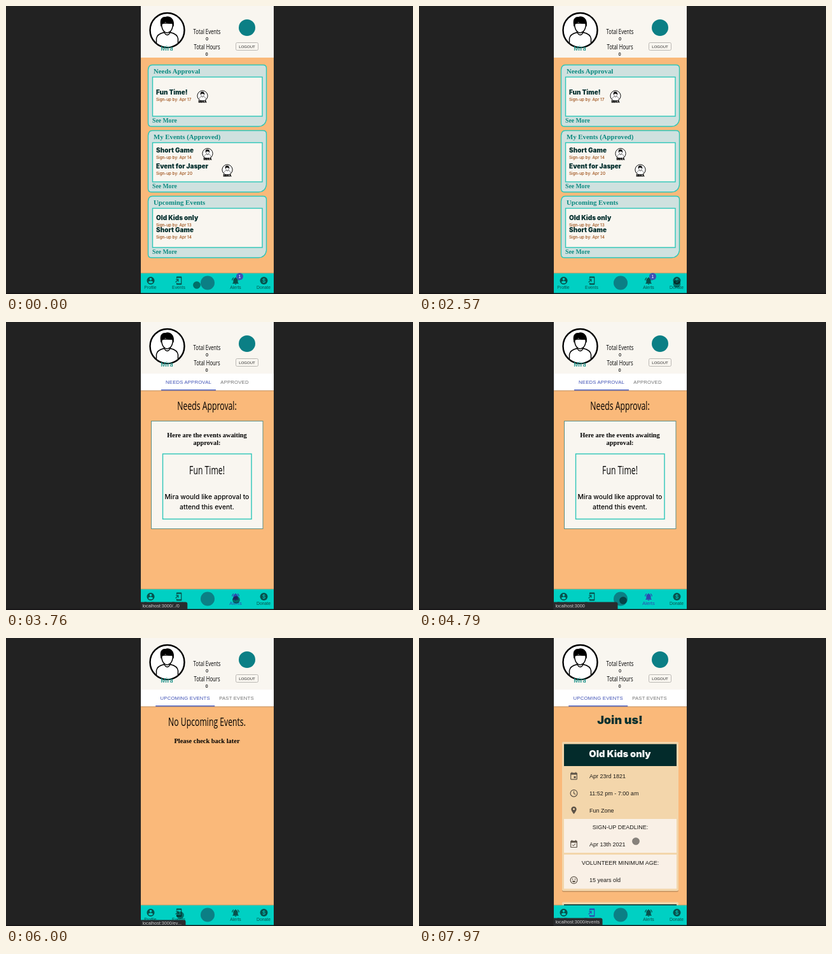
An HTML page that plays this animation: 640 by 452 pixels, repeating every 8000 ms.

```html
<!DOCTYPE html>
<html lang="en">
<head>
<meta charset="utf-8">
<title>Volunteer app</title>
<style>
html, body { margin: 0; width: 100%; height: 100%; overflow: hidden; background: #222; }
svg { display: block; width: 100%; height: 100%; }
text { font-family: "Liberation Sans", Arial, sans-serif; white-space: pre; }
.serif { font-family: "Liberation Serif", Times, serif; font-weight: 700; }
.round { font-family: Inter, sans-serif; font-weight: 500; }
.fat { font-family: Inter, sans-serif; font-weight: 900; }
.slim { font-family: "Open Sans", sans-serif; font-weight: 500; }
.tab { font-size: 7.7px; letter-spacing: .2px; }
</style>
</head>
<body>
<svg id="stage" viewBox="0 0 640 452"></svg>
<script>
const LOOP = 8000;
const TEAL = '#2cc6b8', INK = '#06302f', CREAM = '#f9f6f0', BLUE = '#3f51b5';
const NAV_INK = '#07524d', TITLE = '#0c8a80', RUST = '#9a4a10', LOGO = '#0b7f85';
const MEMBER = 'Mira';

const ICONS = {
  person: 'M12 2C6.48 2 2 6.48 2 12s4.48 10 10 10 10-4.48 10-10S17.52 2 12 2zm0 3c1.66 0 3 1.34 3 3s-1.34 3-3 3-3-1.34-3-3 1.34-3 3-3zm0 14.2c-2.5 0-4.71-1.28-6-3.22.03-1.99 4-3.08 6-3.08 1.99 0 5.97 1.09 6 3.08-1.29 1.94-3.5 3.22-6 3.22z',
  phone: 'M18 1H8c-1.1 0-2 .9-2 2v3h2V5h10v14H8v-1H6v3c0 1.1.9 2 2 2h10c1.1 0 2-.9 2-2V3c0-1.1-.9-2-2-2zM10 15h2V8H5v2h3.59L3 15.59 4.41 17 10 11.41V15z',
  bell: 'M7.58 4.08L6.15 2.65C3.75 4.48 2.17 7.3 2.03 10.5h2c.15-2.65 1.51-4.97 3.55-6.42zm12.39 6.42h2c-.15-3.2-1.73-6.02-4.12-7.85l-1.42 1.43c2.02 1.45 3.39 3.77 3.54 6.42zM18 11c0-3.07-1.64-5.64-4.5-6.32V4c0-.83-.67-1.5-1.5-1.5s-1.5.67-1.5 1.5v.68C7.63 5.36 6 7.92 6 11v5l-2 2v1h16v-1l-2-2v-5zm-6 11c1.1 0 2-.9 2-2h-4c0 1.1.9 2 2 2z',
  day: 'M17 12h-5v5h5v-5zM16 1v2H8V1H6v2H5c-1.11 0-2 .9-2 2v14c0 1.1.89 2 2 2h14c1.1 0 2-.9 2-2V5c0-1.1-.9-2-2-2h-1V1h-2zm3 18H5V8h14v11z',
  check: 'M16.53 11.06L15.47 10l-4.88 4.88-2.12-2.12-1.06 1.06L10.59 17l5.94-5.94zM19 3h-1V1h-2v2H8V1H6v2H5c-1.11 0-2 .9-2 2v14c0 1.1.89 2 2 2h14c1.1 0 2-.9 2-2V5c0-1.1-.9-2-2-2zm0 16H5V8h14v11z',
  pin: 'M12 2C8.13 2 5 5.13 5 9c0 5.25 7 13 7 13s7-7.75 7-13c0-3.87-3.13-7-7-7zm0 9.5c-1.38 0-2.5-1.12-2.5-2.5s1.12-2.5 2.5-2.5 2.5 1.12 2.5 2.5-1.12 2.5-2.5 2.5z'
};

const text = (x, y, s, size, fill = '#000', cls = '', mid = false) =>
  `<text x="${x}" y="${y}" class="${cls}" fill="${fill}"${size ? ` font-size="${size}"` : ''}${mid ? ' text-anchor="middle"' : ''}>${s}</text>`;
const center = (x, y, s, size, fill, cls) => text(x, y, s, size, fill, cls, true);
const slim = (x, y, s, size) =>
  `<g transform="translate(${x} ${y}) scale(.68 1)">${center(0, 0, s, size, '#000', 'slim')}</g>`;
const rect = (x, y, w, h, fill, extra = '') =>
  `<rect x="${x}" y="${y}" width="${w}" height="${h}" fill="${fill}" ${extra}/>`;
const circle = (x, y, r, fill, extra = '') =>
  `<circle cx="${x}" cy="${y}" r="${r}" fill="${fill}" ${extra}/>`;
const icon = (x, y, name, k = .6) =>
  `<path transform="translate(${x - 12 * k} ${y - 12 * k}) scale(${k})" d="${ICONS[name]}"/>`;
const group = (id, body, extra = '') => `<g id="${id}" ${extra}>${body}</g>`;

// Generic person badge drawn around 0,0 in a circle of radius 27
const avatar = (x, y, k, line) => `<g transform="translate(${x} ${y}) scale(${k})" stroke="#000" stroke-linejoin="round">
  <circle r="27" fill="#fff" stroke-width="${line}"/>
  <path d="M-17 20.5V13Q-16 6-5 3.500V-1H5V3.500Q16 6 17 13V20.500Q0 33-17 20.500Z" fill="#fff" stroke-width="1.500"/>
  <path d="M-5 3Q0 12 5 3" fill="none" stroke-width="1.500"/>
  <path d="M-9-11C-9 0-4 4 0 4S9 0 9-11Z" fill="#fff" stroke-width="1.500"/>
  <path d="M-9.500-6C-12-16-9-21-3-20.500C4-23 12-18 9.500-6L8-11Q2-10-3-13Q-6-10-8-10Z"/></g>`;
const miniAvatar = (x, y) => avatar(x, y, .3, 3.2) + center(x, y + 10.5, MEMBER.toUpperCase(), 4.8, '#000', 'fat');

const entry = (y, name, date) =>
  text(236, y, name, 10, INK, 'fat') + text(236, y + 10.2, 'Sign-up by: ' + date, 6.3, RUST, 'round');

const homeCard = (y, title, body) =>
  `<path d="M230 ${y}H404Q409.500 ${y} 409.500 ${y + 5}V${y + 85}Q408 ${y + 96} 397 ${y + 96.5}H228.500Q223.500 ${y + 96.5} 223.500 ${y + 91}V${y + 8}Q224 ${y} 230 ${y}Z" fill="#cfe1df" stroke="${TEAL}" stroke-width="1.400"/>`
  + rect(230.5, y + 19, 172.5, 61.5, CREAM, `stroke="${TEAL}" stroke-width="1.4"`)
  + text(232, y + 13.5, title, 10.8, TITLE, 'serif')
  + text(230, y + 90, 'See More', 9.7, TITLE, 'serif') + body;

const tabs = (x, w, on, x2, off) =>
  rect(212, 82, 209, 26.5, '#00000030') + rect(212, 81, 209, 26.3, '#fff')
  + center(x, 97, on, 0, BLUE, 'tab') + center(x2, 97, off, 0, '#737373', 'tab')
  + rect(x - w / 2, 106, w, 1.4, BLUE);

const home = homeCard(92.5, 'Needs Approval', entry(139, 'Fun Time!', 'Apr 17') + miniAvatar(309, 141))
  + homeCard(195.5, 'My Events (Approved)',
      entry(230, 'Short Game', 'Apr 14') + miniAvatar(317, 231.5)
      + entry(255, 'Event for Jasper', 'Apr 20') + miniAvatar(348, 257))
  + homeCard(298.5, 'Upcoming Events',
      entry(335.5, 'Old Kids only', 'Apr 13') + entry(355.2, 'Short Game', 'Apr 14'));

const alerts = tabs(287, 86, 'NEEDS APPROVAL', 359.5, 'APPROVED')
  + slim(316, 138, 'Needs Approval:', 18)
  + rect(228.5, 155.5, 175.5, 169, CREAM, 'stroke="#5e8f84"')
  + center(316, 181.3, 'Here are the events awaiting', 10.35, '#000', 'serif')
  + center(316, 193.3, 'approval:', 10.35, '#000', 'serif')
  + rect(246.5, 207, 139.5, 102.3, CREAM, `stroke="${TEAL}" stroke-width="1.4"`)
  + slim(316, 239, 'Fun Time!', 18)
  + center(316, 277.5, MEMBER + ' would like approval to', 10.4, '#000', 'round')
  + center(316, 294, 'attend this event.', 10.4, '#000', 'round');

const eventTabs = tabs(281.7, 93, 'UPCOMING EVENTS', 362.5, 'PAST EVENTS');

const empty = eventTabs + slim(316, 138, 'No Upcoming Events.', 18)
  + center(316, 164.5, 'Please check back later', 10.4, '#000', 'serif');

const eventCard = y => rect(225, y + 1.5, 183, 234, '#00000038', 'rx="2"')
  + rect(225, y, 183, 234, '#f3d6ab', 'rx="2"') + rect(228, y + 3.5, 177, 34.5, '#032b2b');
const row = (y, s) => text(268, y + 3.2, s, 9, '#1c1a17');
const GREY = '#5d5347';

const events = eventTabs + center(316, 135, 'Join us!', 18, INK, 'fat')
  + eventCard(163) + center(316, 187, 'Old Kids only', 14.7, '#fff', 'fat')
  + rect(228, 284, 177, 53, '#f9f0e6') + rect(228, 340, 177, 53.5, '#f9f0e6')
  + row(217, 'Apr 23rd 1821') + row(243.7, '11:52 pm - 7:00 am') + row(270.4, 'Fun Zone')
  + center(316.5, 300, 'SIGN-UP DEADLINE:', 9, '#1c1a17') + row(323.7, 'Apr 13th 2021')
  + center(316.5, 356, 'VOLUNTEER MINIMUM AGE:', 9, '#1c1a17') + row(380, '15 years old')
  + `<g fill="${GREY}">${icon(243.5, 217, 'day')}${icon(243.5, 270.4, 'pin')}${icon(243.5, 323.7, 'check')}
     <circle cx="241.500" cy="378.500" r=".9"/><circle cx="245.500" cy="378.500" r=".9"/><path d="M240.500 381H246.500Q243.500 386 240.500 381Z"/></g>`
  + `<g fill="none" stroke="${GREY}" stroke-width="1.200"><circle cx="243.500" cy="243.700" r="5.400"/>
     <circle cx="243.500" cy="380" r="5.400"/><path d="M243.500 240.500V244L246.200 245.600"/></g>`
  + eventCard(414.5);

const header = rect(212, 0, 209, 81, CREAM)
  + avatar(253.5, 38, 1, 2.4) + center(253, 70, MEMBER, 9.2, TITLE, 'round')
  + slim(316, 44, 'Total Events', 11.3) + center(316, 53.5, '0', 6.5, '#000', 'round')
  + slim(316, 68, 'Total Hours', 11.3) + center(315.5, 78, '0', 6.5, '#000', 'round')
  + circle(379, 34, 13, LOGO)
  + rect(361.5, 57.5, 35, 12, 'none', 'rx="2" stroke="#b5b3ae" stroke-width=".9"')
  + center(379, 65.7, 'LOGOUT', 6, '#222');

const navItem = (id, x, label, art) => group(id, art + `<text x="${x}" y="444.300" text-anchor="middle">${label}</text>`);
const nav = rect(212, 418.5, 209, 2, '#00000022') + rect(212, 419.5, 209, 31.5, '#00d0c3')
  + circle(317, 434.5, 11, LOGO)
  + navItem('profile', 227, 'Profile', icon(227.5, 431, 'person'))
  + navItem('list', 271.5, 'Events', icon(271.5, 431, 'phone'))
  + navItem('bell', 361, 'Alerts', icon(361, 431.5, 'bell'))
  + navItem('give', 405, 'Donate', circle(405.5, 431, 6, 'inherit') + center(405.5, 434.2, '$', 9, '#00d0c3'))
  + group('badge', circle(0, 0, 5.5, BLUE) + center(0, 2.4, '1', 6.8, '#fff'));

const stage = document.getElementById('stage');
stage.innerHTML = '<defs><clipPath id="body"><path d="M212 81H421V451H212Z"/></clipPath></defs>'
  + rect(0, 0, 640, 452, '#222') + rect(212, 0, 209, 451, '#fab97a') + header
  + `<g clip-path="url(#body)">${group('home', home)}${group('alerts', alerts)}${group('empty', empty)}${group('events', events)}</g>`
  + nav + rect(0, 450.5, 640, 1.5, '#151315')
  + circle(361.5, 436, 18, '#000', 'id="ripple"')
  + group('status', '<path id="bubble" fill="#2a2c2e"/>' + text(214.5, 447.5, '', 7.2, '#cfcfcf'))
  + circle(0, 0, 5.6, '#000', 'id="cursor" fill-opacity=".46" stroke="#000" stroke-opacity=".25" stroke-width=".8"');

const el = id => document.getElementById(id);
const set = (id, attrs) => { for (const k in attrs) el(id).setAttribute(k, attrs[k]); };
const clamp = v => Math.max(0, Math.min(1, v));
const ease = v => v * v * (3 - 2 * v);
const ramp = (t, a, b) => ease(clamp((t - a) / (b - a)));

// time, x, y
const PATH = [
  [0, 300, 438], [700, 290, 438], [1460, 256, 436], [1720, 228, 436], [1850, 227, 436],
  [2500, 407, 436], [2600, 405, 436], [2860, 362, 436], [4200, 362, 436], [4790, 321, 437],
  [5300, 321, 437], [5950, 274, 435], [6250, 274, 435], [6860, 226, 432], [7250, 226, 432],
  [7970, 341, 319], [LOOP, 341, 319]
];

function cursorAt(t) {
  const i = PATH.findIndex(p => p[0] > t);
  const a = PATH[i - 1], b = PATH[i], k = ramp(t, a[0], b[0]);
  return [a[1] + (b[1] - a[1]) * k, a[2] + (b[2] - a[2]) * k];
}

const pageAt = t => t < 2900 ? 'home' : t < 4900 ? 'alerts' : t < 5950 ? 'home' : t < 6350 ? 'empty' : 'events';

function statusAt(t) {
  if (t < 5700) {
    return { s: t < 4650 ? 'localhost:3000/../0' : 'localhost:3000',
      w: 69 + 32 * ramp(t, 3700, 3950),
      drop: 0, show: ramp(t, 2750, 2880) * (1 - ramp(t, 5450, 5650)) };
  }
  return { s: t < 6300 ? 'localhost:3000/ev...' : 'localhost:3000/events',
    w: 71 + 6 * ramp(t, 6250, 6400),
    drop: 6 * (1 - ramp(t, 5930, 6070)), show: ramp(t, 5900, 5960) };
}

function highlight(id, on) {
  set(id, { fill: on ? '#2f48b0' : NAV_INK });
  el(id).lastElementChild.setAttribute('font-size', on ? 7.6 : 6.8);
}

function draw(t) {
  const page = pageAt(t);
  for (const id of ['home', 'alerts', 'empty', 'events']) set(id, { display: id === page ? 'inline' : 'none' });
  highlight('profile', false);
  highlight('give', false);
  highlight('bell', page === 'alerts' && t > 2960);
  highlight('list', t > 6050);

  set('badge', { transform: `translate(367.5 424.5) scale(${clamp(1 - (t - 2900) / 65)})` });
  set('ripple', {
    r: 18 * ramp(t, 2820, 2940),
    opacity: t < 2820 ? 0 : .2 * (1 - ramp(t, 2980, 3400))
  });

  const st = statusAt(t);
  set('status', { opacity: st.show, transform: `translate(0 ${st.drop})` });
  set('bubble', { d: `M211.5 439.5h${st.w - 3}q3 0 3 3v${9 - Math.min(st.drop, 6)}h${-st.w}z` });
  el('status').lastElementChild.textContent = st.s;

  const [x, y] = cursorAt(t);
  set('cursor', { cx: x, cy: y });
}

const start = performance.now();
function tick() {
  draw((performance.now() - start) % LOOP);
  requestAnimationFrame(tick);
}
tick();
</script>
</body>
</html>
```
